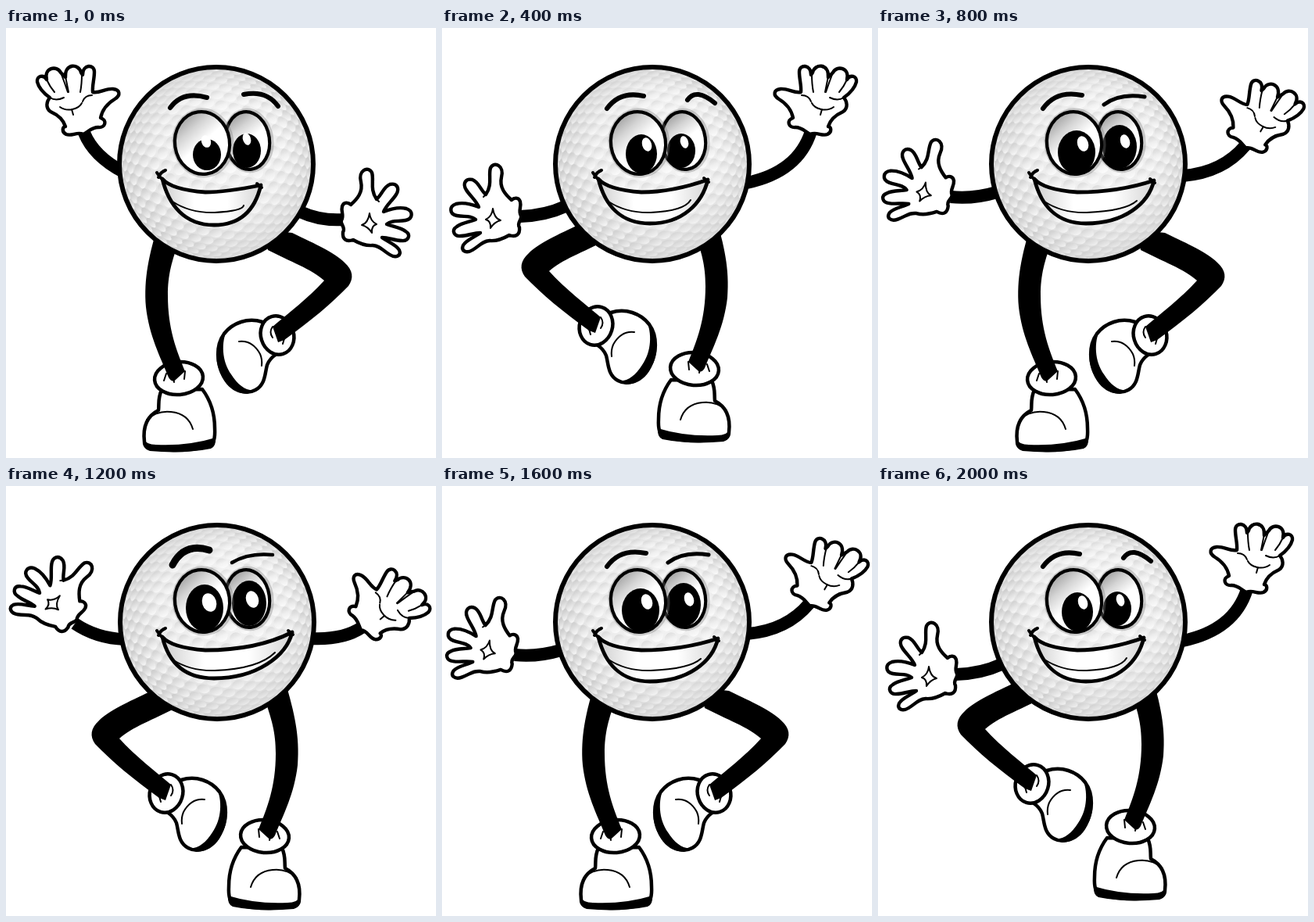
These frames come from a looping animation (550x550 px, 2400 ms). An HTML page with a canvas:

```html
<!DOCTYPE html>
<html lang="en">
<head>
<meta charset="utf-8">
<title>Dancing golf ball</title>
<style>
html, body { margin: 0; width: 100%; height: 100%; overflow: hidden; background: #fff; }
canvas { display: block; }
</style>
</head>
<body>
<canvas id="stage" width="550" height="550"></canvas>
<script>
const ctx = document.getElementById('stage').getContext('2d');
const TAU = Math.PI * 2;
const path = d => new Path2D(d);

function oval(x, y, rx, ry, tilt = 0) {
  const shape = new Path2D();
  shape.ellipse(x, y, rx, ry, tilt, 0, TAU);
  return shape;
}

// Each hand is drawn once and hung from its wrist.
const waveHand = {
  wrist: [100, 138],
  outline: path(`M76 126 C73 116 66 111 57 107 C50 102 52 94 56 89 C49 84 42 77 40 69
    C39 61 48 59 52 66 C48 51 65 47 70 57 L76 63 C75 45 93 45 96 57 L98 60
    C98 46 113 46 113 56 C113 66 110 74 111 82 C119 84 128 77 137 78
    C146 79 147 86 139 91 C129 97 123 105 121 115 C130 118 127 128 118 127
    C110 127 106 132 99 136 C91 132 84 139 77 136 C71 133 72 126 76 126 Z`),
  creases: path(`M52 66 Q56 75 62 82 M70 57 Q75 70 79 82 M76 62 L80 82 M97 59 Q97 72 95 82
    M56 89 Q64 94 74 89 M69 101 Q76 106 85 104 Q94 102 97 96 M84 104 L86 111
    M110 86 Q101 86 98 94`)
};
const spreadHand = {
  wrist: [430, 249],
  outline: path(`M441 226 C449 219 457 210 454 197 C450 182 463 176 468 185
    C471 195 465 206 474 219 C481 213 483 203 491 200 C500 198 504 205 499 213
    C494 221 486 227 483 235 C493 231 504 229 512 231 C521 234 521 244 511 246
    C502 248 494 245 487 251 C495 254 505 255 511 260 C519 265 514 273 506 272
    C497 272 490 268 481 268 C489 274 499 277 503 284 C506 291 499 295 491 290
    C481 284 479 279 469 278 C459 279 451 275 444 271 C435 274 430 270 431 261
    C435 255 427 251 429 246 C433 240 428 235 430 228 C432 222 438 223 441 226 Z`),
  creases: path(`M455 252 Q463 250 465 237 Q466 247 474 251 Q467 253 468 262
    Q463 254 455 252 M474 219 L477 222`)
};

const limbs = {
  straightLeg: path(`M195 250 C183 290 176 320 179 357 C183 393 197 420 208 447
    Q213 455 218 449 L229 439 C218 412 207 385 207 342 C207 315 212 299 222 270 Z`),
  bentLeg: path(`M330 258 L366 262 C397 277 420 287 433 300 C444 310 445 320 438 330
    C417 352 388 376 356 399 L348 402 L341 382 C362 364 386 346 407 323
    C392 309 362 298 335 284 Z`),
  standingShoe: path(`M199 463 C194 474 196 480 195 489 C179 497 175 512 177 529
    Q177 538 188 538 Q226 543 261 535 Q268 530 267 512 C267 490 260 474 251 462 Z`),
  standingSole: path(`M176 525 Q179 533 192 533 Q232 535 268 524 Q269 535 262 538
    Q226 545 184 541 Q174 538 176 525 Z`),
  standingCuff: oval(221, 448, 31, 21, -0.08),
  standingCreases: path('M180 501 Q193 489 211 491 Q233 493 239 513 M205 442 L202 451 M213 442 L215 453 M229 439 L228 449'),
  liftedShoe: path(`M328 376 C309 370 290 377 279 391 C268 406 269 429 279 446
    C288 463 306 470 319 463 C332 456 331 442 334 431 Q337 423 346 417 Z`),
  liftedSole: path(`M283 385 C275 402 276 426 288 443 C297 457 307 465 320 463
    C306 473 289 466 279 451 C263 426 269 400 283 385 Z`),
  liftedCuff: oval(347, 393, 21, 25, -0.3),
  liftedCreases: path('M298 401 Q315 399 325 417 Q328 424 327 432 M341 382 Q336 389 341 396 M356 397 L354 404')
};

// Brows are [path, width]; pupils and lights are x, y, rx, ry.
const poses = [
  {
    ballX: 269, legs: [1, 0, 0],
    arms: 'M100 134 Q112 164 150 184 M376 235 Q402 247 432 245',
    hands: [[waveHand, 100, 138, 0, 1], [spreadHand, 430, 249, 0, 1]],
    brows: [['M210 102 Q226 80 257 89', 6], ['M304 85 Q333 79 348 100', 6]],
    pupils: [[257, 162, 18, 20], [308, 157, 18, 22]],
    lights: [[256, 145, 6, 8], [308, 142, 5, 8]],
    mouth: [326, 201, 252]
  },
  {
    ballX: 269, legs: [-1, 544, -12],
    arms: 'M100 241 Q132 240 158 228 M472 132 Q456 184 390 198',
    hands: [[spreadHand, 100, 243, 0, -1], [waveHand, 470, 138, 0, -1]],
    brows: [['M211 103 Q228 80 258 87', 6], ['M314 92 Q325 76 349 96', 6]],
    pupils: [[255, 161, 20, 25], [306, 157, 18, 22]],
    lights: [[262, 149, 6, 9], [310, 146, 5, 8]],
    mouth: [340, 194, 250]
  },
  {
    ballX: 269, legs: [1, 1, 0],
    arms: 'M93 216 Q122 219 152 210 M470 150 Q441 185 390 189',
    hands: [[spreadHand, 93, 216, 11, -1], [waveHand, 469, 155, 14.5, -1]],
    brows: [['M211 103 Q228 79 261 86', 6], ['M289 98 Q309 83 341 88', 5]],
    pupils: [[254, 159, 24, 28], [309, 152, 22, 28]],
    lights: [[262, 148, 7, 10], [316, 145, 6, 9]],
    mouth: [353, 195, 250]
  },
  {
    ballX: 270, legs: [-1, 552, 0],
    arms: 'M88 176 Q116 195 152 196 M455 181 Q431 197 390 195',
    hands: [[spreadHand, 88, 172, 40, -1], [waveHand, 452, 185, 34, -1]],
    brows: [['M213 101 Q228 72 260 82', 9], ['M289 98 Q310 85 341 88', 4.5]],
    pupils: [[254, 156, 24, 30], [311, 150, 22, 29]],
    lights: [[260, 149, 9, 12], [315, 145, 8, 11]],
    mouth: [366, 187, 246]
  }
];
const sequence = [0, 1, 2, 3, 2, 1];

function stroke(shape, width, color = '#000') {
  ctx.lineWidth = width;
  ctx.strokeStyle = color;
  ctx.stroke(shape);
}
function fill(shape, color = '#000') {
  ctx.fillStyle = color;
  ctx.fill(shape);
}
function inked(shape, width, color = '#fff') {
  fill(shape, color);
  stroke(shape, width);
}
function shade(x0, y0, x1, y1, ...colors) {
  const gradient = ctx.createLinearGradient(x0, y0, x1, y1);
  colors.forEach((c, i) => gradient.addColorStop(i / (colors.length - 1), c));
  return gradient;
}

function drawHand([hand, x, y, degrees, side]) {
  ctx.save();
  ctx.translate(x, y);
  ctx.rotate(degrees * TAU / 360);
  ctx.scale(side, 1);
  ctx.translate(-hand.wrist[0], -hand.wrist[1]);
  inked(hand.outline, 4.4);
  stroke(hand.creases, 2);
  ctx.restore();
}

function drawLegs([side, x, y]) {
  ctx.save();
  ctx.translate(x, y);
  ctx.scale(side, 1);
  for (const name of ['standing', 'lifted']) {
    inked(limbs[name + 'Shoe'], 4.5);
    fill(limbs[name + 'Sole']);
    inked(limbs[name + 'Cuff'], 4.5);
    stroke(limbs[name + 'Creases'], 2);
  }
  fill(limbs.straightLeg);
  fill(limbs.bentLeg);
  ctx.restore();
}

// Dimples form a hexagonal grid wrapped over a sphere.
function drawBall(cx) {
  const cy = 174, radius = 124, step = 0.15;
  const ball = oval(cx, cy, radius, radius);
  const light = ctx.createRadialGradient(cx + 25, cy - 45, 10, cx, cy, radius);
  light.addColorStop(0, '#f6f6f6');
  light.addColorStop(0.65, '#ebebeb');
  light.addColorStop(1, '#d4d4d4');
  fill(ball, light);
  ctx.save();
  ctx.clip(ball);
  for (let row = -12; row <= 12; row++) {
    for (let col = -11; col <= 11; col++) {
      const u = (col + (row & 1) / 2) * step, v = row * step * 0.866;
      const angle = Math.hypot(u, v);
      if (angle > 1.45) continue;
      const turn = Math.atan2(v, u) + 0.2, reach = radius * Math.sin(angle);
      ctx.save();
      ctx.translate(cx + reach * Math.cos(turn), cy + reach * Math.sin(turn));
      fill(oval(0, 0, 8 * Math.cos(angle), 8, turn),
        shade(-3, -7, 3, 7, 'rgba(0,0,0,.07)', 'rgba(255,255,255,.1)', 'rgba(255,255,255,.75)'));
      ctx.restore();
    }
  }
  ctx.restore();
  stroke(ball, 6);
}

function drawEye(x, y, rx, ry, pupil, highlight) {
  const eye = oval(x, y, rx, ry, -0.14);
  stroke(oval(x + 1, y, rx + 2, ry + 2, -0.14), 5, 'rgba(120,120,120,.35)');
  fill(eye, shade(x - rx * 0.8, y - ry * 0.8, x, y, '#9c9c9c', '#d4d4d4', '#fff'));
  ctx.save();
  ctx.clip(eye);
  fill(oval(...pupil));
  fill(oval(...highlight, -0.3), '#fff');
  ctx.restore();
  stroke(eye, 4.2);
}

function drawMouth([right, top, bottom]) {
  const mid = (200 + right) / 2;
  const lips = path(`M200 193 Q212 207 255 210 Q${right - 45} 210 ${right} ${top}
    C${right - 7} ${top + 30} ${mid + 38} ${bottom} 266 ${bottom}
    C228 ${bottom} 208 226 200 193 Z`);
  inked(lips, 4.8, shade(198, 0, right, 0, '#ccc', '#fff', '#fff', '#d5d5d5'));
  stroke(path(`M213 222 Q236 237 267 236 Q${mid + 40} 234 ${right - 22} ${top + 26}`), 2);
  stroke(path(`M193 185 Q196 190 202 196 M195 191 Q198 184 204 182
    M${right - 5} ${top - 2} L${right + 1} ${top + 3}`), 4);
}

function draw(pose) {
  ctx.fillStyle = '#fff';
  ctx.fillRect(0, 0, 550, 550);
  ctx.lineJoin = 'round';
  ctx.lineCap = 'butt';
  stroke(path(pose.arms), 16);
  ctx.lineCap = 'round';
  pose.hands.forEach(drawHand);
  drawLegs(pose.legs);
  drawBall(pose.ballX);
  drawEye(309, 144, 28, 37, pose.pupils[1], pose.lights[1]);
  drawEye(251, 147, 35, 40, pose.pupils[0], pose.lights[0]);
  pose.brows.forEach(([d, width]) => stroke(path(d), width));
  drawMouth(pose.mouth);
}

let shown = -1;
function tick() {
  const next = sequence[Math.floor(performance.now() / 400) % sequence.length];
  if (next !== shown) draw(poses[shown = next]);
  requestAnimationFrame(tick);
}
tick();
</script>
</body>
</html>
```
